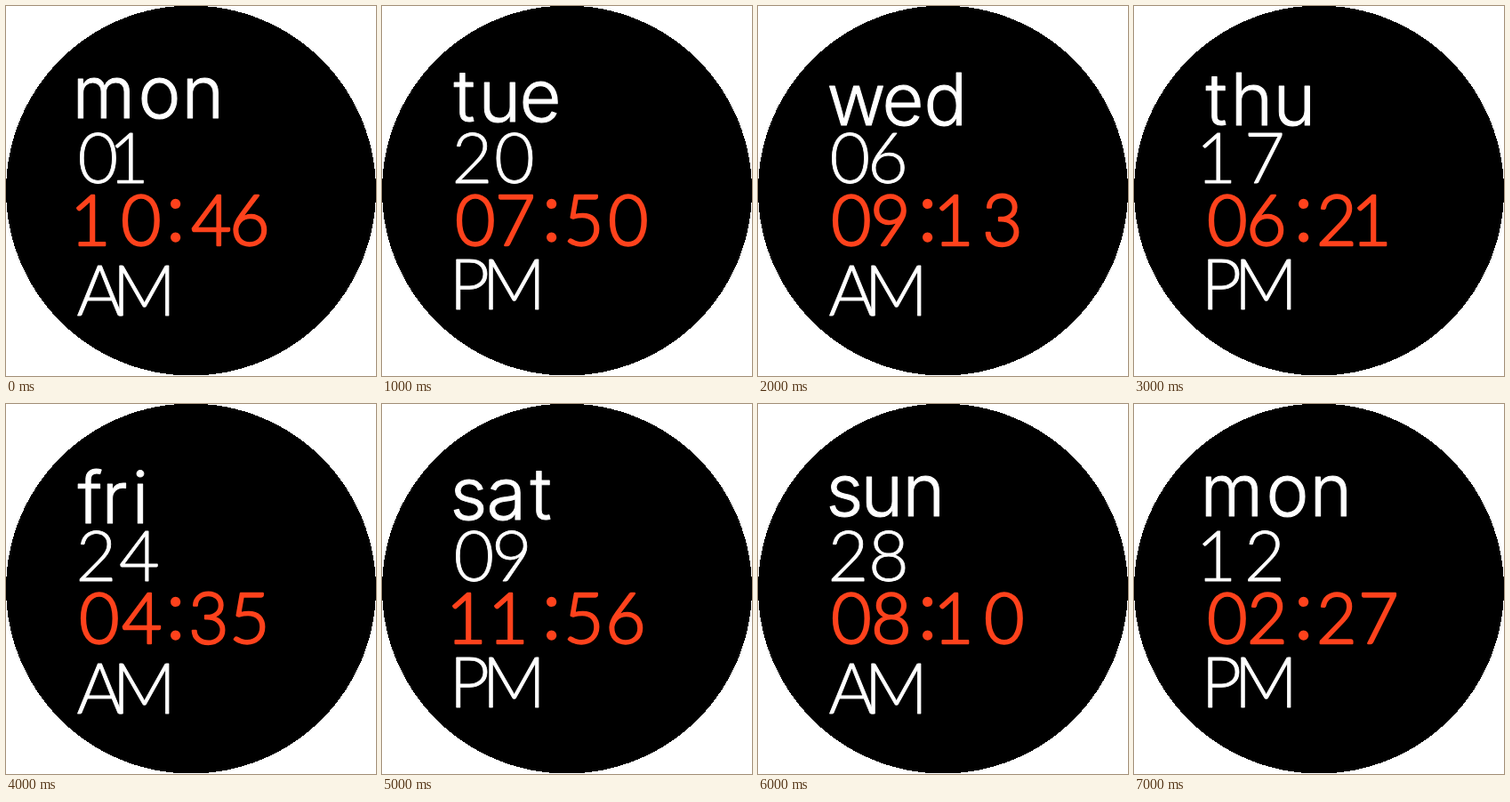
An HTML page that plays this animation: 416x416 px, repeating every 8000 ms.

```html
<!DOCTYPE html>
<html lang="en">
<head>
<meta charset="utf-8">
<title>Watch face</title>
<style>
  html, body { margin: 0; width: 100%; height: 100%; overflow: hidden; background: #fff; }
  svg { display: block; width: 100vw; height: 100vh; }
  text { fill: #fff; stroke: #fff; stroke-linejoin: round; font-feature-settings: "cv09"; }
  #time { fill: #ff421c; stroke: #ff421c; }
</style>
</head>
<body>
<svg viewBox="0 0 416 416">
  <circle cx="208" cy="207.5" r="208" shape-rendering="crispEdges"/>
  <text id="day"></text>
  <text id="date"></text>
  <text id="time"></text>
  <text id="half"></text>
</svg>
<script>
const STEP = 1000;

// Bottom edge and left ink edge of each letter
const DAYS = {
  mon: [126, 80, 152, 203],
  tue: [130, 80, 114, 158],
  wed: [134, 80, 143, 190],
  thu: [134, 80, 114, 162],
  fri: [134, 80, 113, 146],
  sat: [130, 80, 120, 166],
  sun: [126, 80, 121, 168]
};
const HALVES = { AM: [348, 80, 127], PM: [341, 83, 120] };
const DATE = [199, 82, 127.5];
const TIME = [270, 83, 130, 184, 208, 255];

// The stroke fine-tunes the weight of the light faces
const STYLES = {
  day: { face: "Inter", size: 81, stroke: 1 },
  date: { face: "Lato", size: 79, stroke: 0.8 },
  time: { face: "Lato", size: 78, stroke: 2.4 },
  half: { face: "Lato", size: 79, stroke: 0.8 }
};

// Glyphs that depart from the face of their line
const GLYPHS = {
  "1": { dx: -5 },
  "3": { face: "Inter", weight: 200 },
  ":": { size: 95, dy: -5 }
};

const FACES = [
  ["mon", "01", "10:46", "AM"],
  ["tue", "20", "07:50", "PM"],
  ["wed", "06", "09:13", "AM"],
  ["thu", "17", "06:21", "PM"],
  ["fri", "24", "04:35", "AM"],
  ["sat", "09", "11:56", "PM"],
  ["sun", "28", "08:10", "AM"],
  ["mon", "12", "02:27", "PM"]
];

const pen = document.createElement("canvas").getContext("2d");

// Distance from a glyph's origin to its left ink edge
function bearing(ch, font) {
  pen.font = font;
  return -pen.measureText(ch).actualBoundingBoxLeft;
}

function glyph(ch, left, bottom, style) {
  const { face, weight = 300, size, stroke, dx = 0, dy = 0 } = { ...style, ...GLYPHS[ch] };
  const font = `${weight} ${size}px ${face}, sans-serif`;
  const span = document.createElementNS("http://www.w3.org/2000/svg", "tspan");
  span.textContent = ch;
  span.setAttribute("x", left + dx + stroke / 2 - bearing(ch, font));
  span.setAttribute("y", bottom + dy - stroke / 2);
  span.style.font = font;
  return span;
}

function setLine(id, str, [bottom, ...lefts]) {
  const line = document.getElementById(id);
  const style = STYLES[id];
  line.setAttribute("stroke-width", style.stroke);
  line.replaceChildren(...[...str].map((ch, i) => glyph(ch, lefts[i], bottom, style)));
}

let shown = -1;

function draw(ms) {
  const index = Math.floor(ms / STEP) % FACES.length;
  if (index === shown) return;
  shown = index;
  const [day, date, time, half] = FACES[index];
  setLine("day", day, DAYS[day]);
  setLine("date", date, DATE);
  setLine("time", time, TIME);
  setLine("half", half, HALVES[half]);
}

const start = performance.now();
function tick() {
  draw(performance.now() - start);
  requestAnimationFrame(tick);
}
tick();
</script>
</body>
</html>
```
